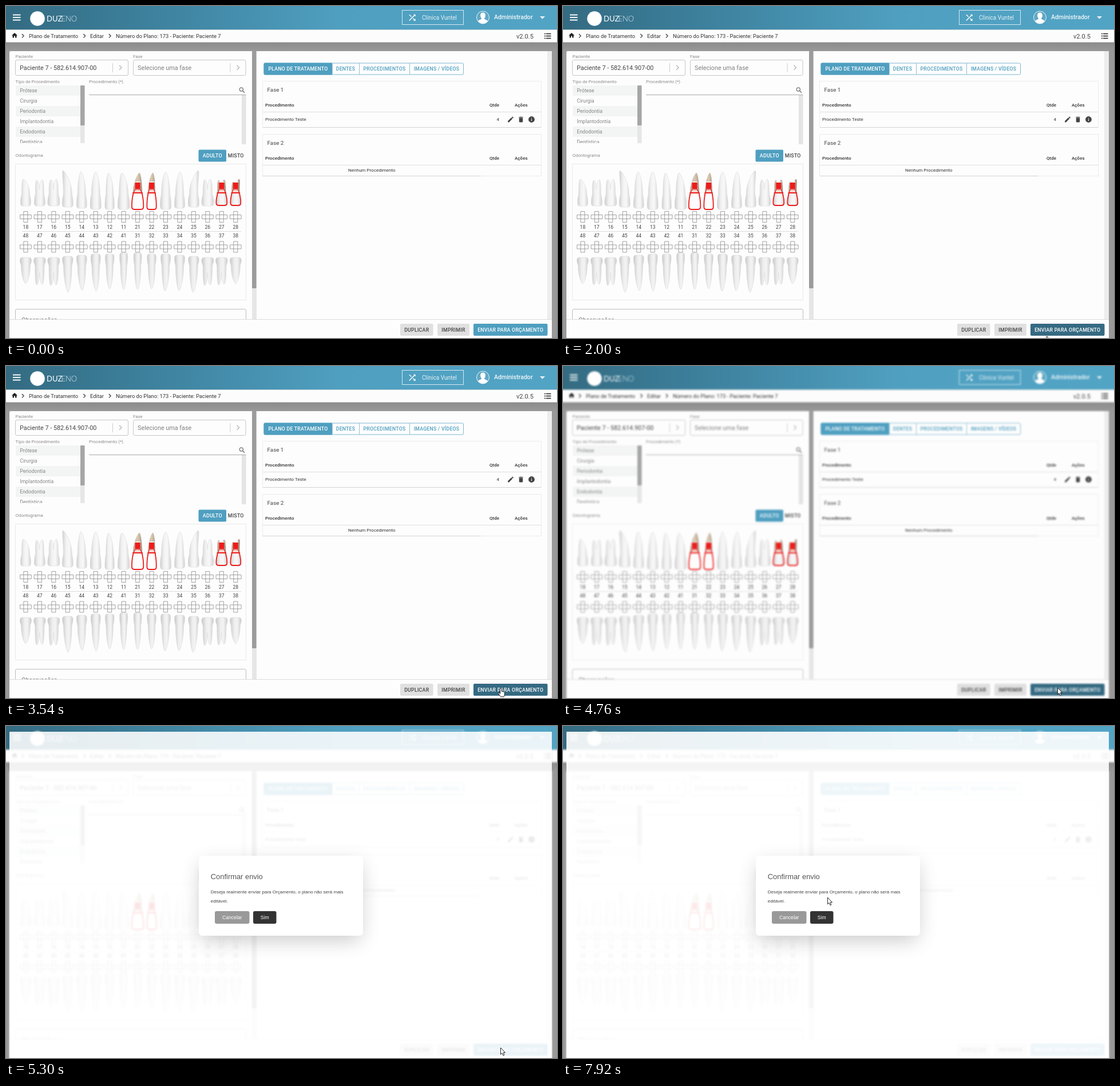
An HTML page that plays this animation: 963x581 px, repeating every 8000 ms.

```html
<!DOCTYPE html>
<html lang="pt">
<head>
<meta charset="utf-8">
<title>Plano de Tratamento</title>
<style>
html, body { margin: 0; width: 100%; height: 100%; overflow: hidden; background: #fff; }
svg { display: block; width: 963px; height: 581px; }
text { font-family: Roboto, sans-serif; white-space: pre; }
.caps { font-weight: 500; letter-spacing: .0286em; }
.mid { text-anchor: middle; }
.med { font-weight: 500; }
.thin { font-weight: 300; }
.logo { font-family: Lato, sans-serif; }
.dlg { font-family: "Liberation Sans", Arial, sans-serif; }
</style>
</head>
<body>
<svg id="stage" viewBox="0 0 963 581" xmlns="http://www.w3.org/2000/svg"></svg>
<script>
const BLUE = '#4f9fc0';
const LOOP = 8000, STEP = 1000 / 13;

const text = (x, y, s, size, fill = '#444', cls = '') =>
  `<text x="${x}" y="${y}" font-size="${size}" fill="${fill}" class="${cls}">${s}</text>`;
const rect = (x, y, w, h, fill, more = '') =>
  `<rect x="${x}" y="${y}" width="${w}" height="${h}" fill="${fill}" ${more}/>`;
const box = (x, y, w, h, stroke, r = 0) =>
  rect(x + .5, y + .5, w - 1, h - 1, 'none', `stroke="${stroke}" rx="${r}"`);
const line = (d, stroke, w = 1) =>
  `<path d="${d}" fill="none" stroke="${stroke}" stroke-width="${w}"/>`;
const icon = (cx, cy, size, fill, d) =>
  `<path transform="translate(${cx - size / 2} ${cy - size / 2}) scale(${size / 24})" fill="${fill}" fill-rule="evenodd" d="${d}"/>`;
const chevron = (x, y, dx, dy, color, w) => dx > dy
  ? line(`M${x - dx} ${y - dy / 2}l${dx} ${dy}l${dx} ${-dy}`, color, w)
  : line(`M${x - dx / 2} ${y - dy}l${dx} ${dy}l${-dx} ${dy}`, color, w);

const gradient = (id, stops, dir = '') =>
  `<linearGradient id="${id}" ${dir}>` + stops.map(([o, c]) =>
    `<stop offset="${o}" stop-color="${c}"/>`).join('') + '</linearGradient>';

const defs = `<defs>
${gradient('head', [[0, '#33697f'], [.25, '#3c7f9b'], [.6, '#4f9fc0'], [1, '#52a4c5']])}
${gradient('band', [[0, '#8b8b8b'], [1, '#999']], 'x2="0" y2="1"')}
${gradient('enamel', [[0, '#cfcfcf'], [.35, '#f2f2f2'], [.65, '#f8f8f8'], [1, '#d2d2d2']])}
${gradient('low', [[0, '#c8c8c8'], [.4, '#efefef'], [.65, '#f3f3f3'], [1, '#cbcbcb']])}
${gradient('bone', [[0, '#a08c78'], [.45, '#dccbb5'], [.7, '#c6b39c'], [1, '#6f6358']])}
<clipPath id="list"><rect x="17" y="139" width="121" height="101"/></clipPath>
<clipPath id="main"><rect x="0" y="63" width="963" height="485"/></clipPath>
<filter id="soft" x="-40%" y="-60%" width="180%" height="240%"><feGaussianBlur stdDeviation="18"/></filter>
</defs>`;

function header() {
  const crumb = (x, s) => text(x, 56.3, s, 9.3, '#333');
  let s = rect(-20, -20, 1003, 61.5, 'url(#head)');
  for (const y of [15.5, 20, 24.5]) s += rect(12, y - .9, 13.5, 1.9, '#fff');
  s += `<circle cx="55" cy="22" r="12.8" fill="#fff"/>`;
  s += text(71, 27.3, 'DUZ', 13, '#fff', 'logo') + text(96.5, 27.3, 'ENO', 13, '#dcecf3', 'logo thin');
  s += box(692, 7, 108, 26, '#d6e8f0');
  s += icon(710, 20.3, 17, '#fff', 'M10.6 9.2L5.4 4 4 5.4l5.2 5.2zM14.5 4l2 2L4 18.6 5.4 20 18 7.5l2 2V4zm.3 9.4l-1.4 1.4 3.1 3.1-2 2.1H20v-5.5l-2 2z');
  s += text(727, 23.6, 'Clinica Vuntel', 10.05, '#e6f1f6');
  s += `<circle cx="833.5" cy="20" r="11" fill="#5fa9c7" stroke="#e8f2f6"/>
    <path d="M833.5 11.5c6 0 5 8 2.3 10.2 .3 2.2 4.7 2.1 6.2 4.6a10.3 10.3 0 0 1-17 0c1.500-2.500 5.900-2.400 6.200-4.600-2.700-2.200-3.700-10.200 2.300-10.200z" fill="#fff"/>`;
  s += text(853, 23.4, 'Administrador', 10.6, '#f1f7fa', 'med');
  s += `<path d="M933 18h9l-4.500 4.800z" fill="#e8f2f6"/>`;
  s += rect(-20, 41.5, 1003, 22, '#fcfcfc');
  s += icon(15, 51.5, 12, '#222', 'M10 20v-6h4v6h5v-8h3L12 3 2 12h3v8z');
  for (const x of [29.5, 137, 181.5]) s += chevron(x, 52.3, 3.2, 3.3, '#333', 1.2);
  s += crumb(40, 'Plano de Tratamento') + crumb(147, 'Editar') +
    crumb(192, 'Número do Plano: 173 - Paciente: Paciente 7');
  s += text(892, 56.5, 'v2.0.5', 11.1, '#444');
  for (const y of [48.5, 52.5, 56.5]) s += rect(941, y - .8, 2, 1.7, '#333') + rect(944, y - .8, 8.5, 1.7, '#333');
  return s;
}

// One outline: crown edge at base, roots running from neck to each [dx, y] tip.
function tooth(cx, neck, base, half, tips, fill) {
  const n = half * .78, dir = Math.sign(base - neck);
  let d = `M${cx - n} ${neck}`, px = cx - n, py = neck;
  tips.forEach(([dx, y], k) => {
    const x = cx + dx, next = tips[k + 1];
    const vx = next ? cx + (dx + next[0]) / 2 : cx + n;
    const vy = next ? neck + (y - neck) * .3 : neck;
    d += `C${px} ${py + (y - py) * .5} ${x - 2.5} ${y} ${x} ${y}`;
    d += `C${x + 2.5} ${y} ${vx} ${vy + (y - vy) * .5} ${vx} ${vy}`;
    px = vx; py = vy;
  });
  return `<path d="${d}${crownTail(cx, n, neck, base, half, dir)}" fill="${fill}" stroke="#d4d4d4" stroke-width=".5"/>`;
}
function crownTail(cx, n, neck, base, h, dir) {
  const q = neck + dir * 6, e = base - dir * 5;
  return `C${cx + n} ${q} ${cx + h} ${q} ${cx + h} ${e}Q${cx + h} ${base} ${cx + h * .55} ${base}` +
    `L${cx - h * .55} ${base}Q${cx - h} ${base} ${cx - h} ${e}C${cx - h} ${q} ${cx - n} ${q} ${cx - n} ${neck}Z`;
}
function implant(cx, base, h, molar) {
  const n = h * .76;
  return `<path d="M${cx - n} 327H${cx + n}${crownTail(cx, n, 327, base, h, 1)}" fill="${molar ? 'url(#enamel)' : '#fcfcfc'}" stroke="#ee1c1c" stroke-width="1.8"/>` +
    `<path d="M${cx - 4} 321H${cx + 4}L${cx + n - .5} 326.500H${cx - n + .5}z" fill="#f3d9d0" stroke="#ee1c1c" stroke-width="1.200"/>` +
    rect(cx - 5.2, 307, 10.4, 1.6, '#f4eee8') + rect(cx - 4.5, 309, 9, 11, '#ee1c1c');
}

function chart() {
  const up = { tip: [303, 304, 303, 288, 290, 290, 292, 292], base: [350, 350, 350, 352, 354, 356, 356, 356],
    half: [9, 9.5, 10.5, 9.5, 9, 9.5, 8.2, 10.2], lean: [-4, 0, 0, -8, -1, 0, -2, -3] };
  const low = { tip: [486, 487, 488, 501, 498, 499, 495, 496], base: [440, 440, 440, 438, 436, 434, 434, 432],
    half: [10, 10.3, 10.5, 9.2, 9, 8.5, 7.8, 7], lean: [0, 0, 0, 1, 1, 1, 0, 0] };
  let s = box(16, 276, 404, 239, '#e9e9e9');
  for (let i = 0; i < 16; i++) {
    const cx = 34.4 + 24.46 * i, j = i < 8 ? i : 15 - i, side = i < 8 ? 1 : -1;
    const double = j === 1 || j === 2;
    const roots = o => double ? [[-5, o.tip[j] + 1], [4.5, o.tip[j]]] : [[o.lean[j] * side, o.tip[j]]];
    const fitted = i === 8 || i === 9 || i > 13;
    const upTips = i === 15 ? [[-4, 307], [6, 303]] : roots(up);
    s += tooth(cx, 327, up.base[j], up.half[j], upTips, fitted ? 'url(#bone)' : 'url(#enamel)');
    if (fitted) s += implant(cx, up.base[j] - (i > 13 ? 1 : 0), up.half[j], i > 13);
    s += tooth(cx, 457, low.base[j], low.half[j], roots(low), 'url(#low)');
    for (const y of [369, 421.5])
      s += line(`M${cx - 3.5} ${y - 9.5}h7v19h-7zM${cx - 9.8} ${y - 3.5}h19.600v7h-19.600z`, '#8c8c8c', .8);
    const q = i < 8 ? 8 - i : i - 7;
    s += text(cx, 390.3, (i < 8 ? '1' : '2') + q, 8.5, '#444', 'mid');
    s += text(cx, 405.3, (i < 8 ? '4' : '3') + q, 8.5, '#444', 'mid');
  }
  return s + line('M28 394.5H411', '#dcdcdc');
}

function leftSide() {
  const label = (x, y, s) => text(x, y, s, 7.9, '#8a8a8a');
  const select = (x, w, s, color) => box(x, 94, w, 28, '#c6c6c6', 2.5) + text(x + 8, 111.6, s, 10.8, color) +
    line(`M${x + w - 27.5} 100V116`, '#ccc') + chevron(x + w - 14, 107.8, 4, 4, '#b5b5b5', 1.3);
  let s = label(16.5, 90.6, 'Paciente') + label(222, 90.6, 'Fase');
  s += select(16, 198, 'Paciente 7 - 582.614.907-00', '#444') + select(222, 197.5, 'Selecione uma fase', '#808080');
  s += label(16.5, 135.3, 'Tipo de Procedimento') + label(145, 135.3, 'Procedimento (*)');
  s += '<g clip-path="url(#list)">';
  ['Prótese', 'Cirurgia', 'Periodontia', 'Implantodontia', 'Endodontia', 'Dentística'].forEach((name, i) => {
    if (i % 2 === 0) s += rect(17, 139 + 18 * i, 113, 18, '#f3f4f4');
    s += text(24.3, 151.2 + 18 * i, name, 8.75, '#858585');
  });
  s += rect(130, 139, 7.5, 101, '#e6e6e6') + rect(130, 139, 7.5, 70, '#a6a6a6', 'rx="1"') + '</g>';
  s += line('M145 155.5H419.500', '#a9a9a9') + rect(412, 156, 7.5, 86, '#e4e4e4');
  s += `<circle cx="411.300" cy="146" r="3.100" fill="none" stroke="#777" stroke-width="1.200"/>` + line('M413.500 148.300L417 151.800', '#777', 1.4);
  s += label(16.5, 264.3, 'Odontograma');
  s += rect(336.5, 251.5, 48.5, 21, BLUE, 'rx="2"') + text(360.8, 265.3, 'ADULTO', 8.75, '#fff', 'caps mid') +
    text(401.7, 265.3, 'MISTO', 8.75, '#444', 'caps mid');
  s += chart();
  return s + box(16, 530, 404, 60, '#bdbdbd', 2.5) + text(27, 553.3, 'Observações', 10.8, '#777');
}

function rightSide() {
  const cell = (x, y, s, cls = 'med') => text(x, y, s, 8.05, '#333', cls);
  const card = (y, h, name) => box(448, y, 488, h, '#ececec') + text(456.6, y + 19.2, name, 9.8, '#444') +
    cell(453, y + 45.3, 'Procedimento') + cell(845, y + 45.3, 'Qtde') + cell(889, y + 45.3, 'Ações') +
    line(`M449 ${y + 54.5}H935`, '#dedede');
  let s = box(450.5, 99.5, 349.5, 21, '#7fb8d1', 2) + rect(450.5, 99.5, 120, 21, BLUE, 'rx="2"');
  s += line('M617.500 100V120M705.500 100V120', '#8fc1d7');
  [[510.5, 'PLANO DE TRATAMENTO'], [593.5, 'DENTES'], [661.5, 'PROCEDIMENTOS'], [752.5, 'IMAGENS / VÍDEOS']]
    .forEach(([x, name], i) => { s += text(x, 113.1, name, 8.7, i ? BLUE : '#fff', 'caps mid'); });
  s += card(131, 82, 'Fase 1') + line('M449 212.500H935', '#d2d2d2');
  s += cell(453, 201.3, 'Procedimento Teste', '') + cell(857.5, 201.3, '4', '');
  s += icon(882, 198.5, 13, '#444', 'M3 17.2V21h3.800L17.800 9.900 14.100 6.200zM20.700 7a1 1 0 0 0 0-1.400l-2.300-2.300a1 1 0 0 0-1.400 0l-1.900 1.800 3.800 3.800z');
  s += icon(900, 198.5, 13, '#444', 'M6 19a2 2 0 0 0 2 2h8a2 2 0 0 0 2-2V7H6zM19 4h-3.500l-1-1h-5l-1 1H5v2h14z');
  s += icon(918.5, 198.5, 13, '#444', 'M12 2a10 10 0 1 0 0 20a10 10 0 0 0 0-20zm1 15h-2v-6h2zm0-8h-2V7h2z');
  s += card(224, 74, 'Fase 2') + cell(598, 290.3, 'Nenhum Procedimento', '');
  return s + line('M449 297.500H830', '#d2d2d2');
}

function footer() {
  const button = (x, w, s, fill, color, id = '') =>
    rect(x, 556, w, 21, fill, `rx="2" ${id}`) + text(x + w / 2, 569.8, s, 8.75, color, 'caps mid');
  return rect(6, 548, 948, 60, '#fdfdfd') + line('M6 548.500H954', '#dcdcdc') +
    button(689, 57.5, 'DUPLICAR', '#e0e0e0', '#444') + button(754, 56, 'IMPRIMIR', '#e0e0e0', '#444') +
    button(817, 129.5, 'ENVIAR PARA ORÇAMENTO', BLUE, '#fff', 'id="send"');
}

function dialog() {
  const button = (x, w, s, fill) => rect(x, 324, w, 22, fill, 'rx="3"') + text(x + w / 2, 338, s, 8.6, '#fff', 'dlg mid');
  return rect(342, 242, 277, 132, '#000', 'opacity=".22" filter="url(#soft)"') +
    rect(337, 227, 287, 140, '#fff', 'rx="6"') +
    text(357.8, 268.3, 'Confirmar envio', 12.9, '#555', 'dlg') +
    text(357.8, 293.4, 'Deseja realmente enviar para Orçamento, o plano não será mais', 8.07, '#444', 'dlg') +
    text(357.8, 309.3, 'editável.', 8, '#444', 'dlg') +
    button(365, 60.5, 'Cancelar', '#999') + button(432, 40.5, 'Sim', '#333');
}

const stage = document.getElementById('stage');
stage.innerHTML = defs + '<g id="page">' +
  rect(-20, -20, 1003, 621, '#999') + rect(-20, 63, 1003, 16, 'url(#band)') +
  rect(6, 79, 948, 520, '#fdfdfd', 'rx="2"') +
  rect(430, 79, 8, 469, '#e6e6e6') + rect(430, 79, 7.5, 415, '#9c9c9c', 'rx="1"') + rect(946, 79, 8, 469, '#ededed') +
  header() + `<g clip-path="url(#main)">${leftSide()}${rightSide()}</g>` + footer() + '</g>' +
  rect(6, 10, 948, 600, '#fff', 'id="veil" rx="1"') + `<g id="dialog">${dialog()}</g>` +
  `<g id="cursor" fill="#fff" stroke="#111" stroke-width=".9" stroke-linejoin="round">
    <path id="arrow" d="M.5 0V11.800L3.100 9.400 5 13.700 6.900 12.900 5.100 8.700H8.500z"/>
    <path id="hand" d="M-1.300 1.500a1.300 1.300 0 0 1 2.600 0V5.300l3.800 .800q1.700 .400 1.600 2l-.600 4-.900 2.700H-.400L-4.300 9.300q-.700-1.600 .800-1.500L-1.300 9.300z"/>
  </g>`;

const $ = id => document.getElementById(id);
const clamp = v => Math.max(0, Math.min(1, v));

// Keys are [tick, value...], thirteen ticks per second.
function track(keys, k) {
  if (k <= keys[0][0]) return keys[0].slice(1);
  for (let i = 1; i < keys.length; i++) {
    const a = keys[i - 1], b = keys[i];
    if (k > b[0]) continue;
    let p = (k - a[0]) / (b[0] - a[0]);
    if (b[0] - a[0] > 9) p = p * p * (3 - 2 * p);
    return a.slice(1).map((v, n) => v + (b[n + 1] - v) * p);
  }
  return keys[keys.length - 1].slice(1);
}

const path = [[1, 880, 592], [2, 884, 570], [4, 906, 520], [6, 927, 454], [12, 927, 454], [23, 837, 552],
  [26, 846, 578], [28, 850, 592], [30, 860, 592], [34, 868, 567], [38, 872, 592], [41, 872, 592],
  [46, 865, 564], [58, 865, 564], [59, 864, 563], [73, 864, 563], [84, 398, 295], [85, 398, 295],
  [87, 440, 289], [91, 514, 299], [96, 514, 299], [103, 462, 300]];
const hover = [[1, 0], [2, .5], [3, .8], [5, 0], [23, 0], [25, 1], [35, 1], [38, 0], [41, 0], [43, 1], [63, 1], [65, 0]];
const blur = [[58, 0], [62, 1.5]];
const veil = [[62, 0], [66, .46], [69, .88], [71, .9]];
const fade = [[63, 0], [66, .5], [69, 1]];

function draw(ms) {
  const k = Math.floor((ms + 15) / STEP);
  const [x, y] = track(path, k), [h] = track(hover, k), [b] = track(blur, k);
  const mix = (from, to) => Math.round(from + (to - from) * clamp(h));
  $('send').setAttribute('fill', `rgb(${mix(79, 53)},${mix(159, 106)},${mix(192, 130)})`);
  $('page').style.filter = b ? `blur(${b}px)` : 'none';
  $('veil').setAttribute('opacity', track(veil, k)[0]);
  $('dialog').setAttribute('opacity', track(fade, k)[0]);
  const hand = k < 60 && y > 555 && x > 817;
  $('hand').style.display = hand ? '' : 'none';
  $('arrow').style.display = hand ? 'none' : '';
  $('cursor').setAttribute('transform', `translate(${x} ${y})`);
}

const start = performance.now();
function tick() {
  draw((performance.now() - start) % LOOP);
  requestAnimationFrame(tick);
}
tick();
</script>
</body>
</html>
```
